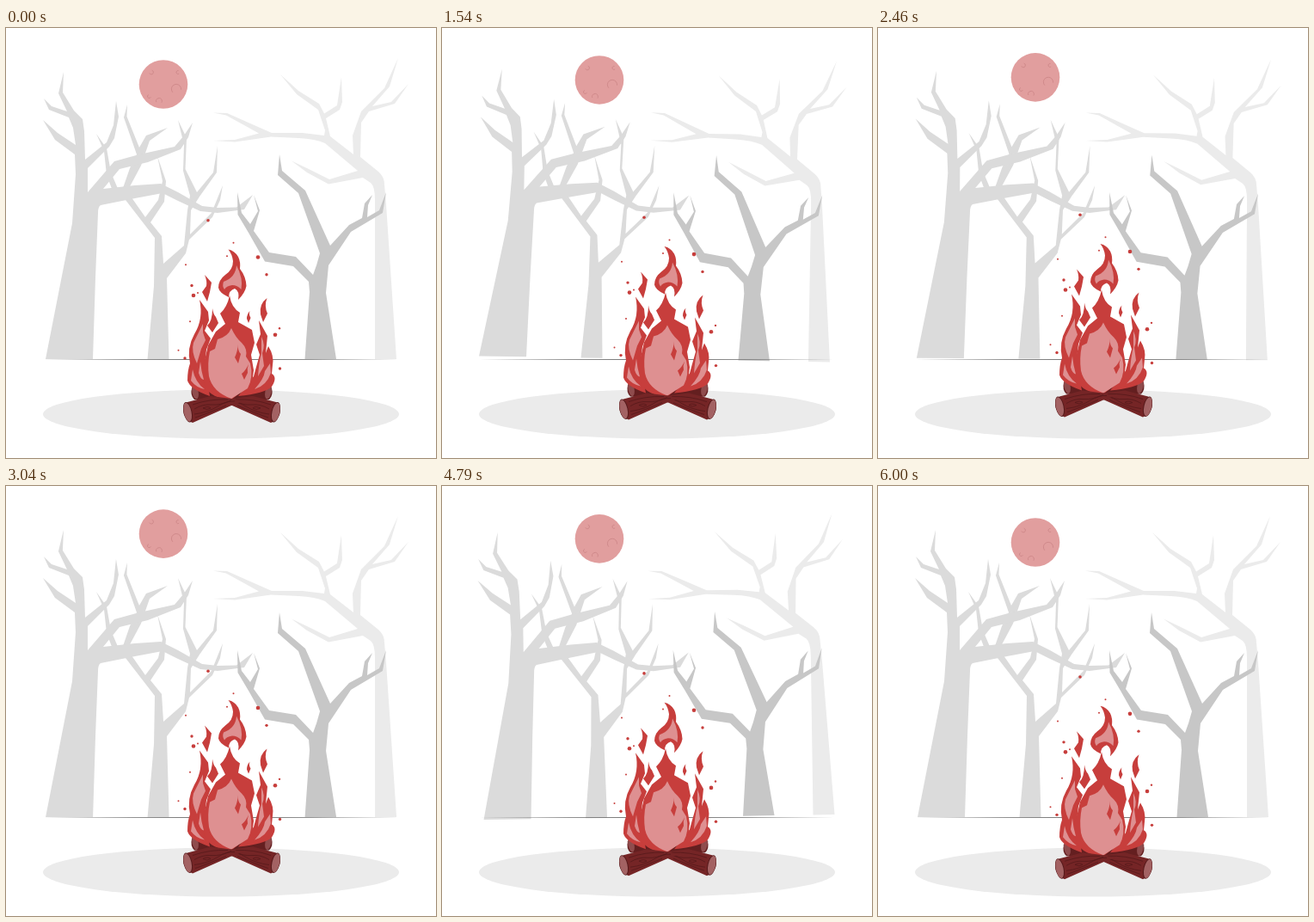
Animation, 500 px wide and 500 px high, one loop 6.04 s. Source, as an HTML page with a canvas:

```html
<!DOCTYPE html>
<html lang="en">
<head>
<meta charset="utf-8">
<title>Campfire</title>
<style>
html, body { margin: 0; width: 100%; height: 100%; overflow: hidden; background: #fff; }
canvas { display: block; width: 500px; height: 500px; }
</style>
</head>
<body>
<canvas id="stage"></canvas>
<script>
const LOOP = 6040, CYCLE = 6000, STEP = 40, FIRE_DELAY = 500;
const RED = '#c73e3c', PINK = '#de9091', BARK = '#752526', DARK = '#561a1b', CUT = '#a36263';

const canvas = document.getElementById('stage');
const ctx = canvas.getContext('2d');
const dpr = window.devicePixelRatio || 1;
canvas.width = canvas.height = 500 * dpr;

const shape = d => new Path2D(d);

const trees = [
  ['#ebebeb', shape(`M429 385L429 200Q429 184 424 180L415 174L375 181.5L350 168L332 154.500L352 164
    L376 176L409 166L371 134Q360 129 340 128L308 126.500L266 132.500L241 131L266 130L294 122.500L276 112.500
    L256 101.500L241 98.500L257 99L283 110.500L309 122L345 122L370 125L371 119L363 95L338 77L319 54
    L340 73L364 88L370 99.500L385 90L390 57L391 86L388 95L372 105L377 126L404 147L403 125L413 97
    L440 70L456 35L446 68L426 91L448 86L468 65L452 88L422 97L413 110L412 150L433 167Q440 173 440 182
    L442 205L454 385Z`)],
  ['#dbdbdb', shape(`M164.500 385L172 300L173 244L139 200L125 192L117 171L114 143L105 123L117 140L122 168
    L131 189L135 189L144 163L152 147L137 104L141 89L140.500 103L155 139L163 125L188 116L167 131
    L157 160L141 190L162 220L177 200L182 178L176 149L186 178L184 202L168 226L181 242L183 274
    L207 253L211 212L214 195L206 166L207 136L200 107L210 128L208.500 164L222 191L241 168L246 137
    L245 168L225 196L215 212L214 240L239 215L252 183L249 200L240 220L213 246L209 262L187 291L189.500 385Z`)],
  ['#dbdbdb', shape(`M46 385L77 227L81 170L80 147L57 130L43 107L60 122L81 136L78 116L73 104L50 95
    L44 82L53 91L71 97L61 76L67 51L66 75L79 96L89 106L91 120L92 153L117 133L125 113L128 85
    L131 103L126 128L120 138L95 163L95 191L126 155L155 147L196 138L207 125L217 110L212 127L203 141
    L165 156L132 164L113 187L150 183L180 181L200 191L228 207L246 209L268 208.500L287 194L277 211
    L246 215L226 213L200 201L182 192L150 198L110 206Q107 208 107 215L104 290L101 385Z`)],
  ['#c7c7c7', shape(`M347.500 385L353 307L352 295L334 277L301 271.500L282 238L269.500 217L269 191L274 215
    L284 228L293 213L288 194L295 212L288 236L306 261L337 266L357 287L361 276L365 262L340 192
    L316 171L318 147L321 166L348 189L377 253L399 229L414 221L417 204L426 194L421 206L420 220
    L434 212L442 191L438 215L401 237L375 276L372 308L384 385Z`)]
];

const flames = [
  `M258.500 257.500Q266 259 270 266Q273 272 272 280Q279 289 279.500 300Q278 308 270 316
   Q272 306 266 303Q259 305 259 313Q248 308 247 302Q247 293 255 287Q264 281 264 271Q263 263 258.500 257.500Z`,
  'M231 287L239 296L237 307L234 318L228 307L233 300Q234 294 231 287Z',
  'M240 326Q241 333 244 336L247 343L240 354L234 346Q240 341 240 326Z',
  'M283.500 329Q282 333 284.500 337L282 343L280 338Q280 333 283.500 329Z',
  'M303.500 314Q300 323 304 332L299 342L296 333Q294 321 303.500 314Z',
  // left tongue
  `M225 316L235 330L236 340L231 352L238 361L233 374L231 392L237 428Q214 420 211 410
   Q211 398 214 390Q210 372 219 356Q230 338 225 316Z`,
  // centre
  `M260 311Q262 325 272 331L270 342L286 351L289 366L285 380L288 398L286 414L262 432
   Q238 431 231 416Q226 398 232 382L235 369L244 353L255 344L249 332Q257 325 260 311Z`,
  // right tongue
  `M294 340L304 358L302 378L305 370Q312 381 310 392L309 402Q316 406 309 417
   Q301 425 270 428L288 405L291 394L295 380L291 368L296 356Z`
].map(shape);

const glows = [
  'M268 276Q276 291 273.500 304Q269 299 263 299Q256 300 254 304Q251 300 253 295Q267 290 268 276Z',
  'M229 344L229 354L232 363L227 373L222 390Q215 376 218 366Z',
  'M217 397Q220 412 231 420Q221 418 215 410Z',
  'M226 388Q227 399 230 409Q226 408 224 401Z',
  `M262 349Q267 360 274 366Q281 373 279 382L284 390Q288 406 281 419L262 431
   Q240 423 236 405Q234 390 237 376L243 373L246 362Q258 359 262 349Z`,
  'M297 359Q302 369 298 378L300 393L293 405Q294 389 297 378Z',
  'M307 390L308 401Q303 416 289 420Q300 408 301 399Z'
].map(shape);

const embers = [
  'M270 368Q269 375 273 379L270 390L266 383Q269 377 270 368Z',
  'M282 391Q280 396 281 401L277 409L274 402Q279 398 282 391Z'
].map(shape);

// x, y, radius
const sparks = [
  [235, 223.7, 1.8], [264.5, 249.8, 1], [257, 265.3, 1], [293, 266.5, 2.3], [303, 286.8, 1.7],
  [209, 275.2, 1], [216, 299.5, 1.7], [218, 311, 2.3], [223, 308, 1], [214, 341.3, 1],
  [313, 356.7, 2.3], [318, 349.3, 1.2], [200.5, 374.8, 1], [208, 384, 1.7], [318.5, 396, 1.7]
];

// x, y, radius, start angle of the rim
const craters = [[198, 71, 6, 2.4], [178, 85, 3.8, 2.8], [166.5, 79.5, 2.4, 0.4],
  [169, 51.5, 2.8, 5], [200, 51.5, 2.4, 1]];

const log = shape('M211 435L238 428L262 431L276 434L262 439L217 459Q206 455 206 443Q206 437 211 435Z');
const backLog = shape('M220 414L264 425L264 436L219 432Q214 427 216 419Z');
const grain = shape(`M217 438Q237 431 258 432M219 443Q229 437 239 438T262 433M219 449Q235 447 246 440T266 434
  M220 453Q235 448 256 439M229 442Q235 439 238 442Q234 445 229 442`);
const ground = shape('M43 385.500Q250 384.300 456 385.500Q250 386.700 43 385.500Z');

function fill(color, path) {
  ctx.fillStyle = color;
  ctx.fill(path);
}

function disc(color, x, y, rx, ry = rx, turn = 0) {
  ctx.fillStyle = color;
  ctx.beginPath();
  ctx.ellipse(x, y, rx, ry, turn, 0, Math.PI * 2);
  ctx.fill();
}

// Runs the drawing twice, the first time flipped about the fire's axis
function mirrored(draw) {
  ctx.save();
  ctx.translate(525, 0);
  ctx.scale(-1, 1);
  draw();
  ctx.restore();
  draw();
}

function drawBackLog() {
  fill('#641f20', backLog);
  disc('#8f4c4d', 220, 423, 3.6, 8.5, -0.2);
}

function drawLog() {
  fill(BARK, log);
  ctx.strokeStyle = DARK;
  ctx.lineWidth = 0.8;
  ctx.stroke(grain);
  disc(DARK, 211.5, 446.7, 5, 12, -0.22);
  disc(CUT, 211.2, 446.7, 4.3, 11.2, -0.22);
}

function drawTrees(turn) {
  ctx.save();
  ctx.translate(255, 210);
  ctx.rotate(turn * Math.PI / 180);
  ctx.translate(-255, -210);
  trees.forEach(([color, path]) => fill(color, path));
  ctx.restore();
}

function drawMoon(dy) {
  ctx.save();
  ctx.translate(0, dy);
  disc('#e19e9e', 183, 65.5, 28.3);
  ctx.lineWidth = 0.9;
  ctx.strokeStyle = '#cd8788';
  for (const [x, y, r, a] of craters) {
    ctx.beginPath();
    ctx.arc(x, y, r - 0.4, a, a + 4);
    ctx.stroke();
  }
  ctx.restore();
}

function drawFire(dy) {
  ctx.save();
  ctx.translate(0, dy);
  mirrored(drawBackLog);
  flames.forEach(p => fill(RED, p));
  glows.forEach(p => fill(PINK, p));
  embers.forEach(p => fill(RED, p));
  mirrored(drawLog);
  sparks.forEach(s => disc(RED, ...s));
  ctx.restore();
}

// 0 to -10 and back, at constant speed
function lift(t) {
  const p = Math.max(0, t) % CYCLE / CYCLE;
  return -10 * (1 - Math.abs(1 - 2 * p));
}

// 0, 1, -1, 0 degrees at constant speed
function sway(t) {
  const p = t % CYCLE / CYCLE;
  return p < 0.25 ? 4 * p : p < 0.75 ? 2 - 4 * p : 4 * p - 4;
}

function draw(t) {
  ctx.setTransform(dpr, 0, 0, dpr, 0, 0);
  ctx.fillStyle = '#fff';
  ctx.fillRect(0, 0, 500, 500);
  drawTrees(sway(t));
  drawMoon(lift(t));
  fill('#707070', ground);
  disc('#ebebeb', 250, 449, 207, 28.5);
  drawFire(lift(t - FIRE_DELAY));
}

const start = performance.now();
function tick() {
  const t = (performance.now() - start) % LOOP;
  draw(Math.floor(t / STEP) * STEP);
  requestAnimationFrame(tick);
}
tick();
</script>
</body>
</html>
```
